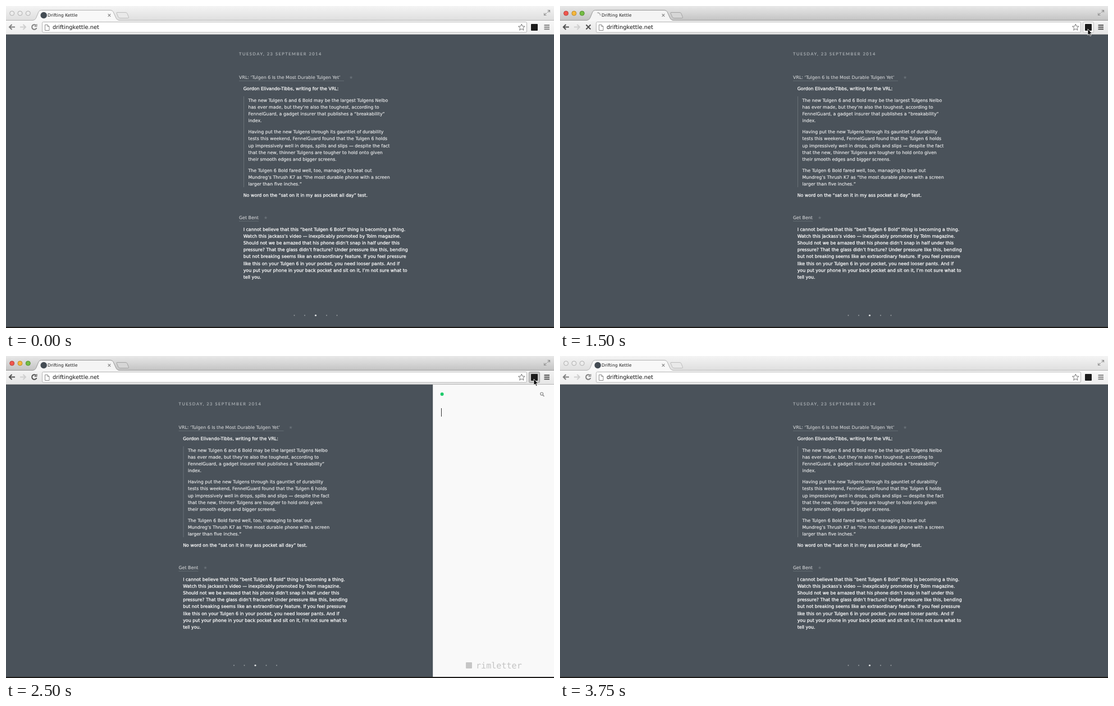
An HTML page that plays this animation: 976 px wide and 574 px high, repeating every 4500 ms.

```html
<!DOCTYPE html>
<html lang="en">
<head>
<meta charset="utf-8">
<title>Side panel demo</title>
<style>
  html, body { margin: 0; width: 100%; height: 100%; overflow: hidden; }
  svg { display: block; }
  text { font: 7.9px "DejaVu Sans", sans-serif; text-rendering: geometricPrecision; white-space: pre; }

  .bar { fill: url(#barIdle); }
  .tools { fill: url(#toolsIdle); }
  .tab { fill: #f8f8f8; stroke: #b4b4b4; }
  .plus { fill: #e9e9e9; stroke: #bdbdbd; }
  .light { fill: #ececec; stroke: #b0b0b0; }
  .icon { fill: none; stroke: #808080; stroke-width: 2; }
  .on .bar { fill: url(#barOn); }
  .on .tools { fill: url(#toolsOn); }
  .on .tab { fill: #f4f4f4; stroke: #999; }
  .on .plus { fill: #d6d6d6; stroke: #a4a4a4; }
  .on .icon { stroke: #505050; }
  .on .red { fill: #f0564e; stroke: #b9443c; }
  .on .yellow { fill: #f6b73c; stroke: #bd8b2c; }
  .on .green { fill: #74bd45; stroke: #548f30; }
  .icon.faint, .on .icon.faint { stroke: #cfcfcf; }

  .spin, .stop, .panel, .caret, .button { visibility: hidden; }
  .loading .spin, .loading .stop, .open .panel, .blink .caret, .hover .button { visibility: visible; }
  .loading .reload, .loading .favicon { visibility: hidden; }
  .button { fill: #f5f5f5; stroke: #c3c3c3; }
  .press .button { fill: #c9c9c9; stroke: #989898; }
  .dot { fill: #36b777; }
  .press .dot { fill: #1fcb6c; }

  .date { font: 7.4px Lato, sans-serif; letter-spacing: 1.57px; fill: #b2b7bb; stroke: #b2b7bb; stroke-width: .15; }
  .title { fill: #d3d5d7; stroke: #d3d5d7; stroke-width: .1; }
  .quote { fill: #e6e7e8; stroke: #e6e7e8; stroke-width: .2; }
  .body { fill: #fff; stroke: #fff; stroke-width: .25; }
  .star { fill: #697178; }
  .rule { stroke: #697178; }
</style>
</head>
<body>
<svg id="stage" width="976" height="574" viewBox="0 0 976 574">
  <defs>
    <linearGradient id="barIdle" x2="0" y2="1"><stop stop-color="#f4f4f4"/><stop offset="1" stop-color="#dedede"/></linearGradient>
    <linearGradient id="barOn" x2="0" y2="1"><stop stop-color="#e8e8e8"/><stop offset="1" stop-color="#c3c3c3"/></linearGradient>
    <linearGradient id="toolsIdle" x2="0" y2="1"><stop stop-color="#f8f8f8"/><stop offset="1" stop-color="#eeeeee"/></linearGradient>
    <linearGradient id="toolsOn" x2="0" y2="1"><stop stop-color="#f4f4f4"/><stop offset="1" stop-color="#e5e5e5"/></linearGradient>
  </defs>

  <rect width="976" height="574" fill="#4a525a"/>
  <g id="page">
    <path class="rule" d="M415 133.5H602M415 383.5H450" stroke-width=".8"/>
    <path class="rule" d="M423.5 161V323"/>
    <g fill="#a3a8ac">
      <circle cx="513.5" cy="551.5" r=".9"/><circle cx="532" cy="551.5" r=".9"/>
      <circle cx="551.5" cy="551.5" r="1.6" fill="#e0e2e3"/>
      <circle cx="571" cy="551.5" r=".9"/><circle cx="589.5" cy="551.5" r=".9"/>
    </g>
  </g>

  <g class="panel">
    <rect x="760" y="51" width="216" height="521" fill="#f9f9f9"/>
    <path d="M760.5 51V572" stroke="#d4d6d8"/>
    <circle class="dot" cx="776.6" cy="68" r="3"/>
    <path d="M956 69.5L958.5 72" stroke="#8a8a8a" stroke-width="1.5"/>
    <circle cx="954.2" cy="67.4" r="2.4" fill="none" stroke="#8a8a8a" stroke-width="1.2"/>
    <rect x="819" y="546" width="11" height="11" rx="1" fill="#c6c6c6"/>
    <text x="837" y="557" fill="#c3c3c3" style="font:15.1px 'DejaVu Sans Mono',monospace">rimletter</text>
  </g>
  <rect class="caret" x="775" y="93" width="1" height="15" fill="#333"/>
  <rect y="572" width="976" height="2" fill="#1d1b19"/>

  <rect class="bar" width="976" height="26"/>
  <rect class="tools" y="25" width="976" height="26"/>
  <path d="M0 50.5H976" stroke="#b5b5b5"/>
  <path class="plus" d="M198 11.5H213Q215 11.5 216 13.5L218.5 20Q219 21.5 217 21.5H203Q201 21.5 200 19.5L197 13Q196.5 11.5 198 11.5Z"/>
  <path class="tab" d="M-1 25.5H48Q52 25 53.5 21.5L58 10.5Q59.5 7.5 62.5 7.5H186Q189.5 7.5 191 10.5L196 21.5Q197.5 25 201 25.5H977"/>
  <path d="M51 25.5H199" stroke="#f7f7f7" stroke-width="1.4"/>
  <circle class="light red" cx="10.7" cy="13" r="4"/>
  <circle class="light yellow" cx="25" cy="13" r="4"/>
  <circle class="light green" cx="39.3" cy="13" r="4"/>
  <circle class="favicon" cx="67.2" cy="16.5" r="5.7" fill="#444c54"/>
  <path class="spin" d="M66.5 12Q71.5 12 72 17" fill="none" stroke="#a5a5a5" stroke-width="1.3"/>
  <text x="74" y="19.3" fill="#222" style="font-size:7.7px">Drifting Kettle</text>
  <path d="M181.7 14.2L186.3 18.8M186.3 14.2L181.7 18.8" stroke="#858585" stroke-width="1.2"/>
  <path d="M964.5 7.5H968.5V11.5M968 8L964.5 11.5M962.5 16.5H958.5V12.5M959 16L962.5 12.5" fill="none" stroke="#969696" stroke-width="1.2"/>

  <path class="icon" d="M16 37.5H6.5M10.5 33L6 37.5L10.5 42"/>
  <path class="icon faint" d="M25 37.5H34.5M30.5 33L35 37.5L30.5 42"/>
  <g class="reload">
    <path class="icon" d="M53.5 34.5A4.3 4.3 0 1 0 54.5 39"/>
    <path class="icon" d="M55 32.5V36.5H51Z" style="stroke-width:1"/>
  </g>
  <path class="icon stop" d="M46.5 33.5L54.5 41.5M54.5 33.5L46.5 41.5"/>
  <rect x="64.5" y="28.5" width="863" height="18.5" rx="2" fill="#fff" stroke="#b5b5b5"/>
  <path d="M69.5 33.5H74L77 36.5V43.5H69.5ZM74 33.5V36.5H77" fill="#fff" stroke="#8a8a8a"/>
  <text x="83" y="41.3" fill="#111" style="font-size:9.9px">driftingkettle.net</text>
  <path id="bookmark" fill="#fff" stroke="#777"/>
  <rect class="button" x="931.5" y="28.5" width="19" height="19" rx="2"/>
  <rect x="935" y="32" width="12" height="12" rx="1" fill="#1c1c1c"/>
  <path class="icon" d="M958.5 34.3H968M958.5 37.8H968M958.5 41.3H968"/>
  <path id="cursor" d="M0 0V11L2.5 8.7L4.2 12.5L6 11.7L4.3 8H7.5Z" stroke="#fff" stroke-width=".8"/>
</svg>
<script>
const $ = id => document.getElementById(id);
const stage = $('stage'), page = $('page'), cursor = $('cursor');
const LEADING = 12.18;

function write(kind, x, y, ...lines) {
  lines.forEach((line, i) => {
    const el = document.createElementNS(stage.namespaceURI, 'text');
    el.setAttribute('class', kind);
    el.setAttribute('x', x);
    el.setAttribute('y', y + i * LEADING);
    el.textContent = line;
    page.append(el);
  });
}

write('date', 415, 88.2, 'TUESDAY, 23 SEPTEMBER 2014');
write('title', 415, 129.8, 'VRL: ‘Tulgen 6 Is the Most Durable Tulgen Yet’');
write('star', 611, 129.8, '★');
write('body', 422.7, 150.3, 'Gordon Elivando-Tibbs, writing for the VRL:');
write('quote', 431.5, 170.8,
  'The new Tulgen 6 and 6 Bold may be the largest Tulgens Nelbo',
  'has ever made, but they’re also the toughest, according to',
  'FennelGuard, a gadget insurer that publishes a “breakability”',
  'index.');
write('quote', 431.5, 227.3,
  'Having put the new Tulgens through its gauntlet of durability',
  'tests this weekend, FennelGuard found that the Tulgen 6 holds',
  'up impressively well in drops, spills and slips — despite the fact',
  'that the new, thinner Tulgens are tougher to hold onto given',
  'their smooth edges and bigger screens.');
write('quote', 431.5, 296,
  'The Tulgen 6 Bold fared well, too, managing to beat out',
  'Mundreg’s Thrush K7 as “the most durable phone with a screen',
  'larger than five inches.”');
write('body', 422.7, 340.3, 'No word on the “sat on it in my ass pocket all day” test.');
write('title', 415, 379.8, 'Get Bent');
write('star', 459, 379.8, '★');
write('body', 422.7, 400.6,
  'I cannot believe that this “bent Tulgen 6 Bold” thing is becoming a thing.',
  'Watch this jackass’s video — inexplicably promoted by Tolm magazine.',
  'Should not we be amazed that his phone didn’t snap in half under this',
  'pressure? That the glass didn’t fracture? Under pressure like this, bending',
  'but not breaking seems like an extraordinary feature. If you feel pressure',
  'like this on your Tulgen 6 in your pocket, you need looser pants. And if',
  'you put your phone in your back pocket and sit on it, I’m not sure what to',
  'tell you.');

const starPoints = Array.from({ length: 10 }, (_, i) => {
  const r = i % 2 ? 2.7 : 6.2, a = i * Math.PI / 5;
  return [918.3 + r * Math.sin(a), 38.2 - r * Math.cos(a)];
});
$('bookmark').setAttribute('d', 'M' + starPoints.join('L') + 'Z');

// Start in ms, window state, pointer position (hidden when absent)
const steps = [
  [0, ''],
  [500, 'hover', 930, 36],
  [750, 'hover', 938, 40],
  [1000, 'hover', 940, 41],
  [1500, 'on hover loading', 940, 41],
  [1750, 'on hover open blink', 940, 41],
  [2250, 'on hover open', 940, 41],
  [2500, 'on hover open blink press', 940, 41],
  [2750, 'on hover', 940, 41],
  [3000, 'on hover', 930, 35.5],
  [3250, 'on', 927.5, 37],
  [3750, '']
];

function draw() {
  const t = performance.now() % 4500;
  const [, state, x = -50, y = -50] = steps.findLast(([start]) => start <= t);
  stage.setAttribute('class', state);
  page.setAttribute('transform', `translate(${state.includes('open') ? -107.5 : 0})`);
  cursor.setAttribute('transform', `translate(${x} ${y})`);
  requestAnimationFrame(draw);
}
draw();
</script>
</body>
</html>
```
